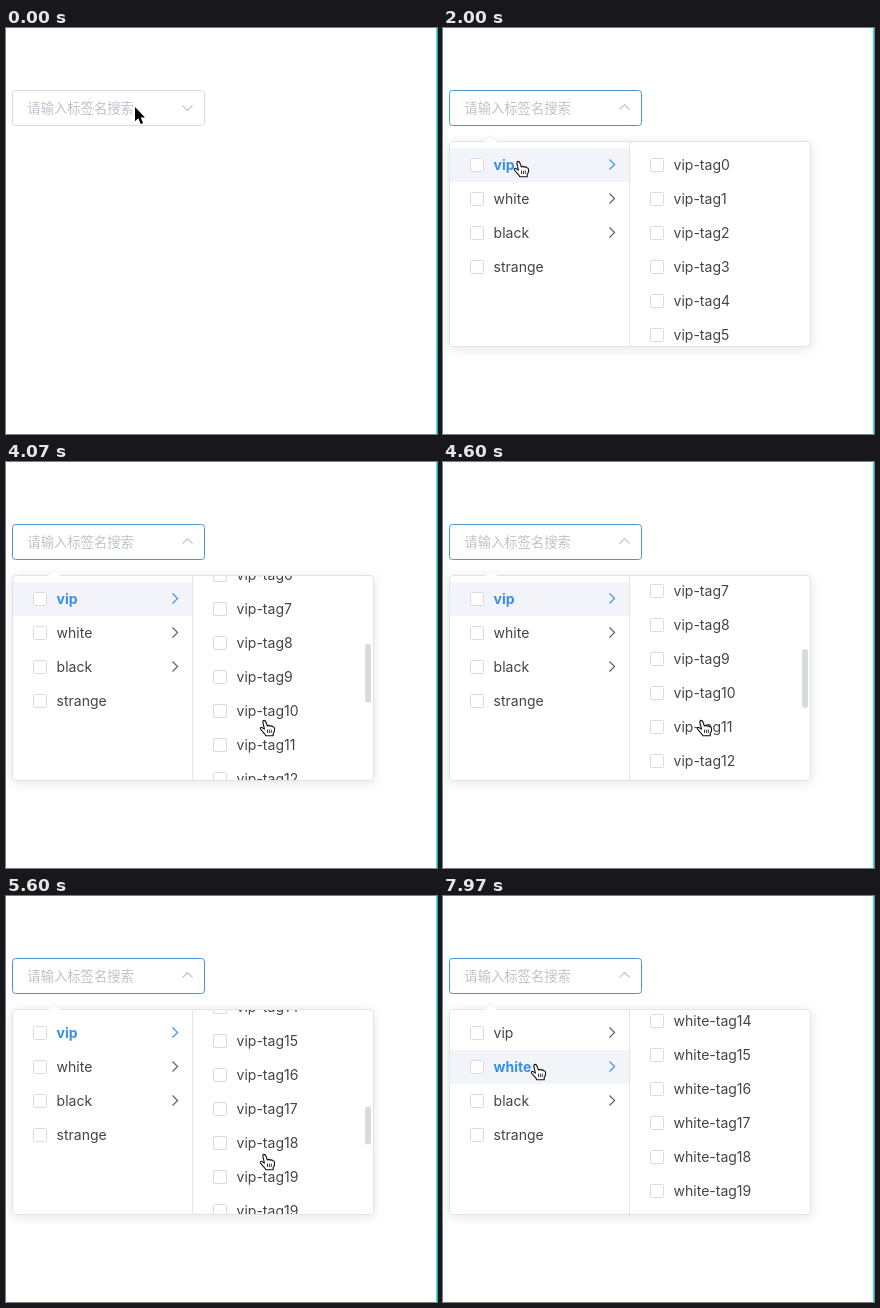
Write an HTML page with a canvas that moves like this. It is 431x406 px and loops after 8 s.

```html
<!DOCTYPE html>
<html lang="zh-CN">
<head>
<meta charset="utf-8">
<style>
html, body { margin: 0; width: 100%; height: 100%; overflow: hidden; background: #fff; }
canvas { display: block; width: 431px; height: 406px; }
</style>
</head>
<body>
<canvas id="stage" width="431" height="406"></canvas>
<script>
const ctx = document.getElementById('stage').getContext('2d');
const LOOP = 8000, ROW = 34, VIEW = 204, TOP = 114, SPLIT = 186;
const BLUE = '#3890e6', RIM = '#4a94d8', TEXT = '#424448', HOVER = '#f3f4fa', LINE = '#d9dbe1', HINT = '#bfc2c9';
const LATIN = 'Inter, "Noto Sans", sans-serif';
const CJK = '"Noto Sans CJK SC", "Noto Sans CJK", sans-serif';
const OPEN = 950, SUBMENU = 2000, MORE = 5430, SWITCH = 7500;

const ease = {
  lin: p => p,
  in: p => p * p,
  out: p => 1 - (1 - p) ** 2.5,
  io: p => p * p * (3 - 2 * p)
};
const clamp = v => Math.max(0, Math.min(1, v));
const ramp = (t, from, len) => clamp((t - from) / len);

// keys: [time, value, easing into this key]
function track(keys, t) {
  let prev = keys[0];
  for (const key of keys) {
    if (t < key[0]) {
      if (key === prev) return key[1];
      const p = ease[key[2] || 'lin']((t - prev[0]) / (key[0] - prev[0]));
      return prev[1] + (key[1] - prev[1]) * p;
    }
    prev = key;
  }
  return prev[1];
}

const SCROLL = [[3100, 0], [3270, 55, 'lin'], [3730, 200, 'out'], [4000, 200], [4070, 228], [4400, 246, 'out'],
  [4600, 246], [4970, 259, 'in'], [5400, 488, 'out'], [5530, 488], [6080, 535, 'out']];
const MOUSE_X = [[530, 129], [900, 103, 'io'], [1350, 103], [1780, 77, 'io'], [2300, 77],
  [2800, 262, 'io'], [3100, 260, 'io'], [6800, 260], [7260, 120, 'io'], [7880, 120], [7965, 94, 'io']];
const MOUSE_Y = [[29, 79], [30, 80], [530, 80], [900, 76, 'io'], [1350, 76], [1780, 133, 'io'], [2300, 133],
  [2850, 294, 'io'], [3100, 258, 'io'], [6800, 258], [7260, 170, 'io'], [7880, 170], [7965, 168, 'io']];

const numbered = (name, from, to) =>
  Array.from({ length: to - from + 1 }, (_, i) => name + '-tag' + (from + i));
const VIP = numbered('vip', 0, 19);
const VIP_MORE = VIP.concat(numbered('vip', 19, 29));
const WHITE = numbered('white', 0, 19);
const GROUPS = ['vip', 'white', 'black', 'strange'];

function box(x, y, w, h, r, fill, stroke) {
  ctx.beginPath();
  ctx.roundRect(x, y, w, h, r);
  if (fill) { ctx.fillStyle = fill; ctx.fill(); }
  if (stroke) { ctx.strokeStyle = stroke; ctx.lineWidth = 1; ctx.stroke(); }
}

function line(points, color, width = 1) {
  ctx.beginPath();
  points.forEach(([x, y]) => ctx.lineTo(x, y));
  ctx.strokeStyle = color;
  ctx.lineWidth = width;
  ctx.stroke();
}

function label(str, x, y, color, font) {
  ctx.font = font;
  ctx.fillStyle = color;
  ctx.fillText(str, x, y);
}

function row(name, x, top, hovered, active) {
  if (hovered) {
    ctx.fillStyle = HOVER;
    ctx.fillRect(x, top, x < SPLIT ? 179 : 180, ROW);
  }
  box(x + 20.5, top + 10.5, 13, 13, 1, '#fff', LINE);
  label(name, x + 43.6, top + 22, active ? BLUE : TEXT, `${active ? 700 : 400} 14px ${LATIN}`);
}

function input(t) {
  const open = ramp(t, OPEN, 300);
  box(6.5, 62.5, 192, 35, 3, '#fff', t >= OPEN ? RIM : LINE);
  label('请输入标签名搜索', 21.3, 85, HINT, `13.333px ${CJK}`);
  ctx.save();
  ctx.translate(181.5, 79.5);
  ctx.rotate(Math.PI * ease.io(open));
  line([[-5, -2.2], [0, 2.8], [5, -2.2]], HINT, 1.2);
  ctx.restore();
}

function frame(w) {
  ctx.save();
  ctx.shadowColor = 'rgba(0,0,0,.1)';
  ctx.shadowBlur = 12;
  ctx.shadowOffsetY = 2;
  box(6, 113, w, 206, 4, '#fff');
  ctx.restore();
  box(6.5, 113.5, w - 1, 205, 3.5, '#fff', '#e0e3e9');
  ctx.beginPath();
  ctx.moveTo(42, 114);
  ctx.lineTo(48, 108);
  ctx.lineTo(54, 114);
  ctx.fillStyle = '#fff';
  ctx.fill();
  line([[42, 113.5], [48, 107.5], [54, 113.5]], '#eff1f5');
}

function groups(t, mouse) {
  const active = t < SUBMENU ? -1 : t < SWITCH ? 0 : 1;
  const over = mouse.x < SPLIT && mouse.y >= 120 ? Math.floor((mouse.y - 120) / ROW) : -1;
  GROUPS.forEach((name, i) => {
    const top = 120 + i * ROW, mid = top + 16.5;
    const focused = i === 0 && t >= SUBMENU && t < MORE;
    row(name, 7, top, over === i || focused, i === active);
    if (i < 3) line([[166.5, mid - 5], [171.6, mid], [166.5, mid + 5]], i === active ? BLUE : '#595b60', 1.1);
  });
}

function tags(t, mouse) {
  const list = t >= SWITCH ? WHITE : t >= MORE ? VIP_MORE : VIP;
  const scroll = t >= SWITCH ? 488 : Math.round(track(SCROLL, t));
  let over = -1;
  if (t >= 3100 && t < 6100) over = 4;   // hover stays with its row while scrolling
  else if (mouse.x > SPLIT) over = Math.floor((mouse.y - 120 + scroll) / ROW);

  ctx.fillStyle = '#e2e5ea';
  ctx.fillRect(SPLIT, TOP, 1, VIEW);
  ctx.save();
  ctx.beginPath();
  ctx.rect(187, TOP, 180, VIEW);
  ctx.clip();
  list.forEach((name, i) => {
    const top = 120 + i * ROW - scroll;
    if (top > 80 && top < 318) row(name, 187, top, i === over, false);
  });
  const shown = mouse.x > SPLIT ? 1 : 1 - ramp(t, 7050, 150);
  if (t > 2300 && shown > 0) {
    const thumb = 200 * VIEW / (list.length * ROW + 12);
    ctx.globalAlpha = shown * ramp(t, 2540, 120);
    box(359, 116 + scroll * thumb / VIEW, 6, thumb, 3, '#d9dade');
  }
  ctx.restore();
}

function popup(t, mouse) {
  const p = ramp(t, OPEN + 30, 300);
  if (!p) return;
  const grow = 1 - (1 - p) ** 4;
  ctx.save();
  ctx.globalAlpha = grow;
  ctx.translate(0, 108);
  ctx.scale(1, grow);
  ctx.translate(0, -108);
  frame(t < SUBMENU ? 182 : 362);
  groups(t, mouse);
  if (t >= SUBMENU) tags(t, mouse);
  ctx.restore();
}

const ARROW = new Path2D('M0 0V14.2L3.3 11.2L5.7 17L8.1 16L5.7 10.4H10Z');
const HAND = new Path2D('M-3.2 1.8Q-3.1 .5-1.8 .4Q-.6 .5-.2 1.8L1.4 6Q3 4.8 4.2 6.2Q5.8 5.3 6.5 6.7' +
  'Q8.3 6.5 8.5 8.3V11L7.2 13.6V15.8H-.2L-.9 14.4L-3.4 11.6L-5.6 9Q-6 7.4-4.3 7.4L-1.6 9.1Z');

function cursor(t, mouse) {
  ctx.save();
  ctx.translate(mouse.x, mouse.y);
  ctx.lineJoin = 'round';
  if (t < 600) {
    ctx.strokeStyle = '#fff';
    ctx.lineWidth = 2;
    ctx.stroke(ARROW);
    ctx.fillStyle = '#000';
    ctx.fill(ARROW);
  } else {
    ctx.fillStyle = '#fff';
    ctx.fill(HAND);
    ctx.strokeStyle = '#111';
    ctx.lineWidth = 1.1;
    ctx.stroke(HAND);
    for (const x of [1.5, 3.4, 5.3]) line([[x, 9.6], [x, 13]], '#222', 0.9);
  }
  ctx.restore();
}

function draw(t) {
  const mouse = { x: track(MOUSE_X, t), y: track(MOUSE_Y, t) };
  ctx.fillStyle = '#fff';
  ctx.fillRect(0, 0, 431, 406);
  input(t);
  popup(t, mouse);
  ctx.fillStyle = '#0ff';
  ctx.fillRect(430, 0, 1, 406);
  cursor(t, mouse);
}

const start = performance.now();
function tick() {
  draw((performance.now() - start) % LOOP);
  requestAnimationFrame(tick);
}
tick();
</script>
</body>
</html>
```
